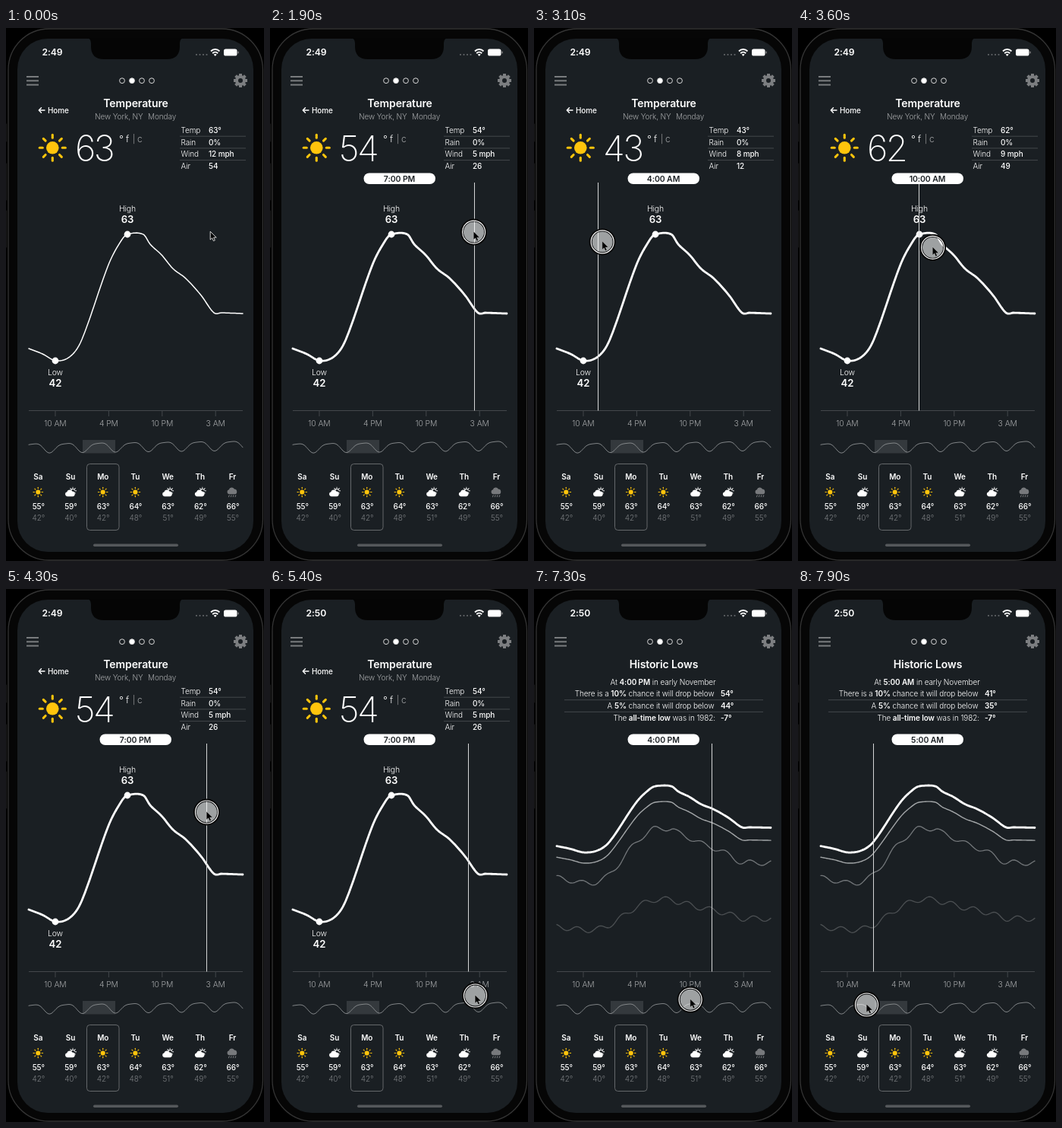
These frames come from a looping animation (340 by 700 pixels, 8 s). An HTML page:

```html
<!DOCTYPE html>
<html lang="en">
<head>
<meta charset="utf-8">
<title>Hourly temperature</title>
<style>
  html, body { margin: 0; width: 100%; height: 100%; overflow: hidden; background: #000; }
  svg { display: block; width: 340px; height: 700px; font: 300 10px Inter, Roboto, sans-serif; letter-spacing: -.1px; fill: #fff; }
  .line { fill: none; stroke: #fff; stroke-linecap: round; stroke-linejoin: round; }
  .mid { text-anchor: middle; }
  .end { text-anchor: end; }
  .bold { font-weight: 600; }
  .val { font-weight: 500; }
  .dim { fill: #a5a7a9; }
  .low { fill: #7b7e81; }
  .title { font-size: 14px; font-weight: 600; }
  .rule { stroke: #43474b; stroke-width: 1; fill: none; }
  .big { font-size: 47px; font-weight: 200; letter-spacing: -2.6px; }
</style>
</head>
<body>
<svg id="stage" viewBox="0 0 340 700"></svg>
<script>
const LOOP = 8000, STEP = 100, LAG = 80;
const LEFT = 30, RIGHT = 312, ROW = 15.7;

// Progress from a to b
const ramp = (t, a, b) => Math.min(1, Math.max(0, (t - a) / (b - a)));
const glide = (t, a, b) => (1 - Math.cos(Math.PI * ramp(t, a, b))) / 2;
const wave = (x, peak, period) => Math.cos(2 * Math.PI * (x - peak) / period);

const knots = [[30, 421], [48, 428], [66, 437], [85, 431], [100, 409], [135, 311], [152, 279], [160, 271], [181, 271],
  [190, 284], [205, 298], [220, 316], [237, 329], [257, 351], [274, 374], [284, 374], [312, 375]];

function spline(points, x) {
  const last = points.length - 1;
  const i = Math.min(last - 1, Math.max(0, points.findIndex(p => p[0] > x) - 1 + (x >= points[last][0] ? last + 1 : 0)));
  const slope = k => {
    const a = points[Math.max(0, k - 1)], b = points[Math.min(last, k + 1)];
    return (b[1] - a[1]) / (b[0] - a[0]);
  };
  const [x0, y0] = points[i], [x1, y1] = points[i + 1];
  const w = x1 - x0, u = (x - x0) / w, v = 1 - u;
  return v * v * (1 + 2 * u) * y0 + u * u * (3 - 2 * u) * y1 + w * u * v * (v * slope(i) - u * slope(i + 1));
}

const PEAK = 271;
const temp = x => spline(knots, x);
const scaled = (x, top, k) => top + (temp(x) - PEAK) * k;
const likely = x => scaled(x, 280, .482);
const rare = x => scaled(x, 315, .43) + 3.5 * wave(x, 111, 31.5);
const record = x => scaled(x, 408, .24) + 3.5 * wave(x, 72, 29);
const week = x => 551 - (x - LEFT) * .012 - 6 * wave(x, 123, 43.5) - 1.5 * wave(x, 133, 21.75);

function curve(f, color, width) {
  let d = '';
  for (let x = LEFT; x <= RIGHT; x += 2) d += `${d ? 'L' : 'M'}${x} ${f(x).toFixed(2)}`;
  return `<path class="line" style="stroke:${color}" stroke-width="${width}" d="${d}"/>`;
}

const text = (x, y, s, cls = '', more = '') => `<text x="${x}" y="${y}" class="${cls}" ${more}>${s}</text>`;
const rule = (x1, y1, x2, y2) => `<path class="rule" d="M${x1} ${y1}L${x2} ${y2}"/>`;
const at = (x, y, s, k = 1) => `<g transform="translate(${x} ${y}) scale(${k})">${s}</g>`;
const repeat = (n, f) => Array.from({ length: n }, (_, i) => f(i)).join('');
const rays = (n, r1, r2, turn = 360 / n) =>
  repeat(n, i => `<path d="M0 ${-r1}V${-r2}" transform="rotate(${i * turn})"/>`);

const sun = `<g fill="#ffc40c" stroke="#ffc40c" stroke-width="3.1" stroke-linecap="round">
  <circle r="8.3" stroke="none"/>${rays(8, 13, 17)}</g>`;
const cloud = (color, y) => `<path transform="translate(-.5 ${y})" fill="${color}"
  d="M-4 5a3.2 3.2 0 0 1-.4-6.3a4 4 0 0 1 7.4-.8a3.6 3.6 0 0 1 .8 7.1z"/>`;
const cloudSun = cloud('#fff', 1) + `<g transform="translate(3.2 -1.8) rotate(-45)" class="line" stroke-width="1">${rays(5, 3.6, 4.8, 45)}
  <path d="M-2 -1.6A2.6 2.6 0 0 1 2.2 1.4"/></g>`;
const rain = cloud('#77797c', -2) + repeat(4, i =>
  `<path class="line" style="stroke:#77797c" stroke-width="1.1" d="M${i * 3 - 4.5} 4.5l-.8 2"/>`);

const phone = `
  <rect width="340" height="700" fill="#000"/>
  <rect x="3" y="1" width="335.5" height="698" rx="54" fill="#060606" stroke="#343434" stroke-width="1.3"/>
  <path d="M.7 126v23M.7 178v48M.7 240v48" class="line" style="stroke:#222"/>
  <rect x="15" y="14" width="311" height="674" rx="40" fill="#1a1f23"/>
  <path d="M107 13q5 1 5 7v4q0 17 17 17h83q17 0 17-17v-4q0-6 5-7z" fill="#050505"/>
  <g fill="#64676a">${repeat(4, i => `<circle cx="${251 + i * 4.5}" cy="35" r="1.1"/>`)}</g>
  <g class="line" stroke-width="2" style="stroke-linecap:butt"><path d="M270 30.5a8 8 0 0 1 11.4 0M272.2 33.2a5 5 0 0 1 7 0"/></g>
  <path d="M275.7 37l-2-2.2a3 3 0 0 1 4 0z"/>
  <rect x="287" y="27.5" width="17.5" height="9" rx="2.6"/><rect x="305.4" y="30.4" width="1.2" height="3.2" rx=".6" fill="#999"/>
  ${repeat(3, i => `<rect x="27" y="${63 + i * 5.3}" width="16" height="2" fill="#797c7e"/>`)}
  <g transform="translate(309 69)" fill="none" stroke="#7c7e80" stroke-width="4"><circle r="5"/>${rays(8, 5.5, 9)}</g>
  ${repeat(4, i => `<circle cx="${153 + i * 13}" cy="69.2" r="3.4" stroke="#d8d8d8" fill="${i === 1 ? '#fff' : 'none'}"/>`)}
  <rect x="115" y="677.5" width="112" height="3.4" rx="1.7" fill="#55585b"/>`;

const axis = rule(LEFT, 502.5, RIGHT, 502.5) + ['10 AM', '4 PM', '10 PM', '3 AM'].map((s, i) => {
  const x = 65 + i * 70.4;
  return rule(x, 502.5, x, 510) + text(x, 523, s, 'mid dim', 'font-size="10.4"');
}).join('') + '<rect x="101" y="541" width="43" height="17.5" fill="#34393d"/>' + curve(week, '#8c8f91', .9);

const days = [['Sa', 55, 42, sun], ['Su', 59, 40, cloudSun], ['Mo', 63, 42, sun], ['Tu', 64, 48, sun],
  ['We', 63, 51, cloudSun], ['Th', 62, 49, cloudSun], ['Fr', 66, 55, rain]];
const forecast = '<rect x="106.5" y="572.5" width="42.5" height="87" rx="4" fill="none" stroke="#65686b"/>' +
  days.map(([name, high, low, icon], i) => {
    const x = 42.3 + i * 42.7;
    return text(x, 592.5, name, 'mid bold') + at(x, 609.5, icon, icon === sun ? .37 : .95) +
      text(x + .5, 632, high + '°', 'mid val') + text(x + .5, 647, low + '°', 'mid low');
  }).join('');

const tempView = text(171, 103.5, 'Temperature', 'title mid') +
  '<path class="line" stroke-width="1.4" d="M51 108H43.5M46.5 104.8L43.3 108L46.5 111.2"/>' + text(55, 111.5, 'Home', 'val') +
  text(117, 119.5, 'New York, NY', 'dim') + text(187, 119.5, 'Monday', 'dim') + at(61.3, 157.3, sun) +
  text(149, 151, '°', '', 'font-size="13"') + text(158, 150, 'f', '', 'font-size="12"') +
  text(167, 150, '|', 'dim', 'font-size="11"') + text(173, 150, 'c', 'dim', 'font-size="12"') +
  ['Temp', 'Rain', 'Wind', 'Air'].map((s, i) => text(230.5, 138 + i * ROW, s)).join('') +
  repeat(3, i => rule(229, 142.2 + i * ROW, 316, 142.2 + i * ROW));

const marker = (x, y, labelY, name, deg) => `<circle cx="${x}" cy="${y}" r="4.4"/>` +
  text(x, labelY, name, 'mid', 'font-size="10.4"') + text(x, labelY + 15.5, deg, 'mid bold', 'font-size="13.2"');
const markers = marker(160, PEAK, 240.5, 'High', 63) + marker(65, 437, 455.5, 'Low', 42);
const lowCurves = curve(record, '#4b4f52', 1.3) + curve(rare, '#73777a', 1.3) + curve(likely, '#a3a6a8', 1.4);

// Sweep left, sweep back, drop below the chart in a shallow arc, sweep left again
function finger(t) {
  const drop = glide(t, 4700, 5320), last = glide(t, 6900, 7880);
  return {
    x: 269 - 185.5 * glide(t, 1850, 2950) + 180.5 * glide(t, 2950, 4220) + 6 * drop - 12 * Math.sin(Math.PI * drop) - 180 * last,
    y: 268 + 25 * glide(t, 1850, 4300) + 241 * drop + 1.5 * glide(t, 5500, 5600) + 10.5 * last
  };
}
const scrubX = t => finger(t - LAG).x - 9 * glide(t, 4700, 5300) + 17 * glide(t, 5700, 6200);

const degrees = h => Math.round(63 - (temp(88 + (h - 4) * 10.6) - PEAK) / 7.9);

function readings(t, h) {
  const day = (h - 4) / 15;
  const [now, wind, air] = t < 1900 ? [63, 12, 54] :
    [degrees(h), 9 - .033 * (h - 8) ** 2, 12 + 14 * day + 33 * Math.sin(Math.PI * day)].map(Math.round);
  return text(91, 174.8, now, 'big') +
    [now + '°', '0%', wind + ' mph', air].map((s, i) => text(267, 138 + i * ROW, s, 'val')).join('');
}

const strong = s => `<tspan class="bold">${s}</tspan>`;
const lowsView = (h, clock) => text(171, 103.5, 'Historic Lows', 'title mid') +
  text(170, 125.5, `At ${strong(clock)} in early November`, 'mid') +
  text(237.5, 141.3, `There is a ${strong('10%')} chance it will drop below`, 'end') +
  text(237.5, 157, `A ${strong('5%')} chance it will drop below`, 'end') +
  text(239, 172.7, `The ${strong('all-time low')} was in 1982:`, 'end') +
  [degrees(h) - 4, Math.round(5 + degrees(h) * 2 / 3), -7].map((v, i) => text(246, 141.3 + i * ROW, v + '°', 'bold')).join('') +
  repeat(2, i => rule(40, 145.7 + i * ROW, 302, 145.7 + i * ROW));

function pointer(t) {
  const { x, y } = finger(t);
  const ring = t < 800 ? '' : `<circle r="13.6" fill="#fff" fill-opacity=".58"/>
    <circle r="15.6" fill="none" stroke="#080808" stroke-width="3.8"/><circle r="15" fill="none" stroke="#fff" stroke-width="1.2"/>`;
  return at(x + .5, y, `${ring}<path d="M-.3-.8V10l2.5-2.2l1.7 3.8l1.9-.8l-1.7-3.7H7.7z" fill="#000"
    stroke="#fff" stroke-opacity="${ring ? .35 : 1}" stroke-width=".8"/>`);
}

const fade = (o, s) => o > 0 ? `<g opacity="${o}">${s}</g>` : '';

function scene(t) {
  const grab = ramp(t, 1400, 1700), swap = glide(t, 5700, 6200);
  const x = scrubX(t);
  const hour = Math.min(19, t <= 6200 ? 4 + Math.round((x - 88) / 11.75) : 19 + Math.round((x - 278.5) / 12.8));
  const clock = `${hour % 12 || 12}:00 ${hour < 12 ? 'AM' : 'PM'}`;
  return phone + text(47.5, 36.3, t < 4500 ? '2:49' : '2:50', 'bold', 'font-size="12.2"') + axis + forecast +
    fade(1 - swap, tempView + readings(t, hour) + markers) +
    fade(swap, lowsView(hour, clock) + lowCurves) +
    curve(x => scaled(x, PEAK - 12 * swap, 1 - .476 * swap), '#fff', 1.5 + 1.3 * grab) +
    fade(grab, `<path d="M${Math.floor(x) + .5} 203V502.5" stroke="#d5d6d7"/>
      <rect x="123.5" y="190.5" width="94.5" height="14.5" rx="7.25"/>` +
      text(170.5, 201.6, clock, 'mid bold', 'style="fill:#1a1f23;font-size:10.5px"')) +
    pointer(t);
}

const stage = document.getElementById('stage');
const start = performance.now();
let shown = -1;
function draw() {
  const t = Math.floor((performance.now() - start) % LOOP / STEP) * STEP;
  if (t !== shown) stage.innerHTML = scene(shown = t);
  requestAnimationFrame(draw);
}
draw();
</script>
</body>
</html>
```
